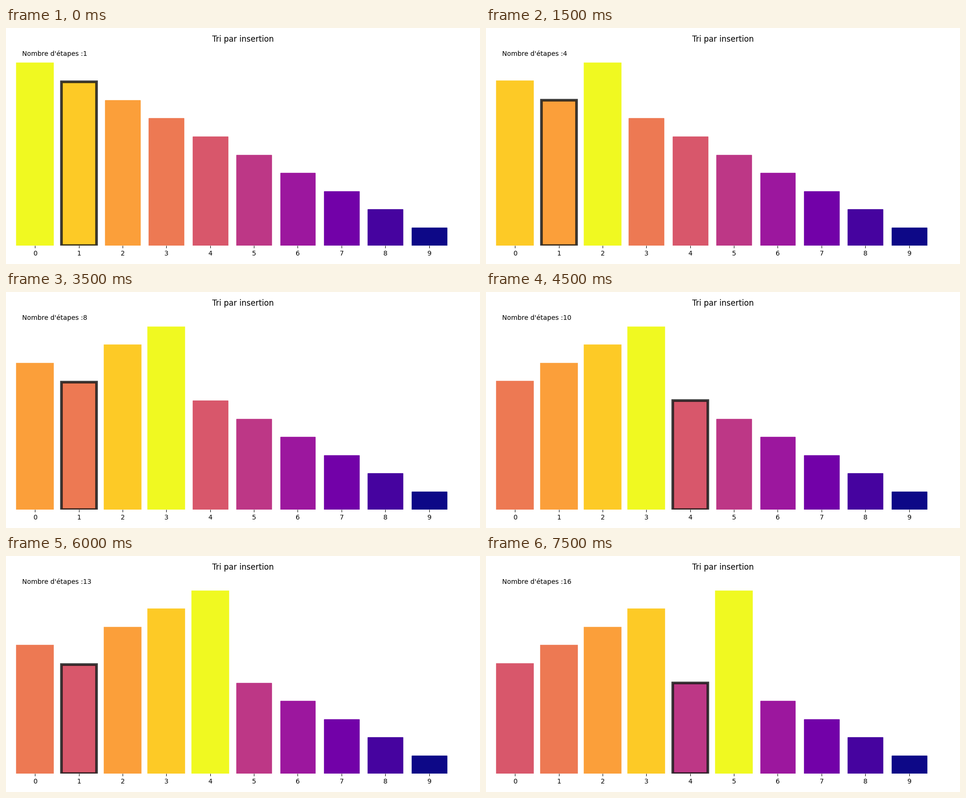
These frames come from a looping animation (1000x500 px, 8000 ms). A matplotlib script:

```python
import matplotlib.pyplot as plt
from matplotlib.animation import FuncAnimation

N = 10
FRAMES = 16
INTERVAL = 500
THIN, THICK = 1, 4
HIGHLIGHT = (0.1, 0.1, 0.1, 0.85)


def insertion_steps(values):
    """Yield (values, cursor, last touched index) for every step."""
    values = list(values)
    for i in range(1, len(values)):
        yield list(values), i, i
        j = i
        while j > 0 and values[j - 1] > values[j]:
            values[j - 1], values[j] = values[j], values[j - 1]
            j -= 1
            yield list(values), j, i


def bar_color(value):
    return plt.cm.plasma((value - 1) / (N - 1))


start = list(range(N, 0, -1))
steps = list(insertion_steps(start))[:FRAMES]

plt.rcParams["font.family"] = "DejaVu Sans"
fig, ax = plt.subplots(figsize=(10, 5), dpi=100)
bars = ax.bar(range(N), start, width=0.8)
ax.set_xlim(-0.5, N)
ax.set_ylim(0, N + 1)
ax.set_xticks(range(N))
ax.set_yticks([])
ax.spines[:].set_visible(False)
ax.set_title("Tri par insertion")
label = ax.text(0.02, 0.95, "", transform=ax.transAxes)
fig.tight_layout()


def draw(k):
    values, cursor, last = steps[k]
    for i, (bar, value) in enumerate(zip(bars, values)):
        color = bar_color(value)
        bar.set_height(value)
        bar.set_facecolor(color)
        bar.set_edgecolor(HIGHLIGHT if i == cursor else color)
        bar.set_linewidth(THICK if i <= last else THIN)
    label.set_text(f"Nombre d'étapes :{k + 1}")
    return [*bars, label]


anim = FuncAnimation(fig, draw, frames=FRAMES, interval=INTERVAL,
                     init_func=lambda: draw(0), repeat=True, repeat_delay=0)
plt.show()
```
